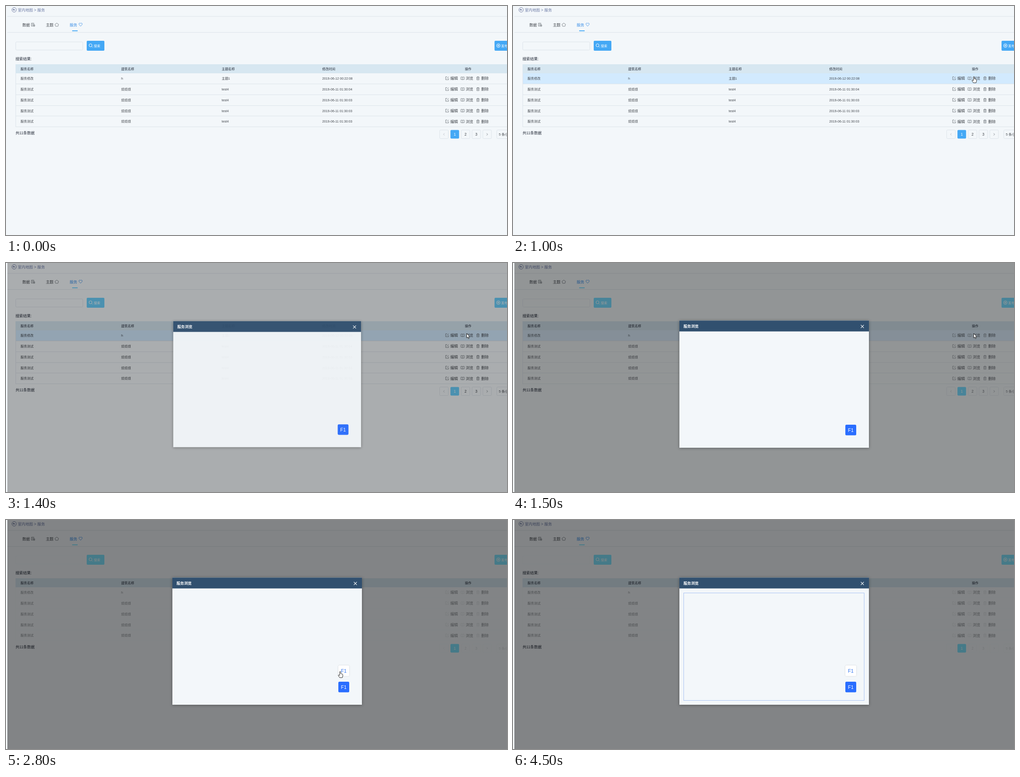
Animation, 1105 px wide and 507 px high, one loop 4800 ms. Source, as an HTML page:

```html
<!DOCTYPE html>
<html lang="zh-CN">
<head>
<meta charset="utf-8">
<title>服务浏览</title>
<style>
html, body { margin: 0; width: 100%; height: 100%; overflow: hidden; background: #f3f7fa; }
svg { display: block; width: 1105px; height: 507px; font-family: "Liberation Sans", "Noto Sans CJK SC", "Noto Sans CJK", sans-serif; }
.line { fill: none; stroke: #dde4ea; }
.icon { fill: none; stroke: #666c73; stroke-width: .8; }
#dialog { filter: drop-shadow(0 1px 3px rgba(0, 0, 0, .35)); }
</style>
</head>
<body>
<svg id="stage" viewBox="0 0 1105 507"></svg>
<script>
const BLUE = '#44a8f5', INK = '#40454b', DARK = '#262d3a';

// Text is placed by its left edge and vertical middle.
const text = (x, y, str, size = 7.2, fill = INK, extra = '') =>
  `<text x="${x}" y="${y + size * .37}" font-size="${size}" fill="${fill}" ${extra}>${str}</text>`;
const rect = (x, y, w, h, attrs) => `<rect x="${x}" y="${y}" width="${w}" height="${h}" ${attrs}/>`;
const path = (d, x = 0, y = 0, attrs = 'class="icon"') => `<path d="${d}" transform="translate(${x} ${y})" ${attrs}/>`;
const button = (x, y, w, h) => rect(x, y, w, h, `rx="2" class="accent" fill="${BLUE}"`);

const EDIT = 'M4 .5H.5V7H7V3.5M2.8 4.8L7.3 .3';
const BOOK = 'M4 1.2Q2 .3 .4 .8V6.4Q2 6 4 6.8Q6 6 7.6 6.4V.8Q6 .3 4 1.2V6.8';
const BIN = 'M0 1.6H6.6M2 1.4V.4H4.6V1.4M.9 1.6V7.4H5.7V1.6M2.5 3.2V5.8M4.1 3.2V5.8';

function header() {
  const trail = '#6d7ba6';
  return `<g fill="none" stroke="#747fa5"><circle cx="18" cy="8.5" r="5"/></g>` +
    path('M17 5.8L14.7 8.2L17 10.6V9.2Q19.5 8.8 20.8 10.6Q20.3 7.2 17 7.2Z', 0, 0, 'fill="#747fa5"') +
    text(26, 8.5, '室内地图 &gt; 服务', 8.4, trail) +
    path('M3 23H1105M3 58.5H1105', 0, 0, 'class="line"') +
    text(36, 42, '数据', 8.4) + text(88, 42, '主题', 8.4) + text(140.5, 42, '服务', 8.4, '#3a8ee6') +
    path('M6 3V.5H.5V7H3.5M2 2.5H4.5M2 4.5H3.5M4.5 4H7.8V7.5H4.5ZM4.5 5.7H7.8', 55.5, 37.5) +
    path('M4 .3L8 3.2L6.6 7.4H1.4L0 3.2Z', 108, 37.5) +
    path('M4 7.6L.6 3.8Q-.4 1 2 .4Q3.4 .3 4 1.6Q4.6 .3 6 .4Q8.4 1 7.4 3.8Z', 160.5, 37.3, 'class="icon" style="stroke:#3a8ee6"') +
    rect(146, 54, 12, 1.8, `class="accent" fill="${BLUE}"`);
}

function toolbar() {
  const white = 'fill="none" stroke="#fff"';
  return rect(21.5, 79.5, 148, 18, 'rx="2" class="line faint"') +
    button(178, 77, 39, 22) + `<g ${white}><circle cx="186.4" cy="87" r="3.3"/></g>` +
    path('M188.8 89.4L191 91.6', 0, 0, white) + text(193.5, 88.3, '搜索', 7.2, '#fff') +
    button(1077.5, 77, 40, 22) + `<g ${white}><circle cx="1086" cy="87.7" r="3.9"/></g>` +
    path('M1083.8 87.7H1088.2M1086 85.5V89.9', 0, 0, white) + text(1092, 88.3, '发布', 7.2, '#fff') +
    text(21, 117, '搜索结果:', 8.4, DARK);
}

function table() {
  const cols = [32, 254, 475.7, 697.5];
  const rows = [['服务修改', 'h', '主题1', '2019-06-12 00:22:08']];
  for (const s of [4, 3, 3, 3]) rows.push(['服务测试', '烦烦烦', 'test4', `2019-06-11 01:30:0${s}`]);
  let out = rect(21, 129, 1084, 20, 'fill="#d7e7f1"') + rect(21, 149, 1084, 23, 'id="hover" fill="#d2eafe"');
  ['服务名称', '建筑名称', '主题名称', '修改时间'].forEach((s, i) => out += text(cols[i], 139.5, s, 7.2, DARK));
  out += text(1012, 139.5, '操作', 7.2, DARK) + path('M21.5 149V268', 0, 0, 'class="line faint"');
  rows.forEach((row, r) => {
    const y = 160.2 + r * 23.9;
    out += path(`M21 ${Math.floor(y + 12)}.5H1105`, 0, 0, 'class="line faint"');
    out += '<g class="soft">' + row.map((s, i) => text(cols[i], y, s)).join('') +
      text(980, y, '编辑', 8.4) + text(1014, y, '浏览', 8.4) + text(1048, y, '删除', 8.4) + '</g>';
    out += '<g class="faint">' + path(EDIT, 969.2, y - 4) + path(BOOK, 1003, y - 3.8) + path(BIN, 1037.6, y - 4) + '</g>';
  });
  return out;
}

function pager() {
  let out = text(21, 280.5, '共11条数据', 8.4, DARK);
  for (let i = 0; i < 5; i++) {
    const x = 956.5 + i * 23.8;
    if (i === 1) out += button(x, 274.5, 19, 19);
    else out += rect(x, 274.5, 19, 19, 'rx="2" class="line faint"');
    if (i % 4) out += text(x + 9.5, 284, i, 8.4, i === 1 ? '#fff' : INK, `text-anchor="middle" ${i > 1 ? 'class="faint"' : ''}`);
  }
  return out + '<g class="faint">' +
    path('M967.2 281.8L964.8 284.2L967.2 286.6', 0, 0, 'fill="none" stroke="#bcc2c9"') +
    path('M1060 281.8L1062.4 284.2L1060 286.6', 0, 0, 'class="icon"') +
    rect(1082.5, 274.5, 50, 19, 'rx="2" class="line"') + text(1087, 284, '5 条/页') + '</g>';
}

function dialog() {
  const floor = (y, fill, ink, attrs = '') => `<g ${attrs}>` + rect(733, y, 24, 23.5, `rx="2.5" fill="${fill}"`) +
    text(745, y + 11.8, 'F1', 10.6, ink, 'text-anchor="middle"') + '</g>';
  return '<g id="dialog">' + rect(367, 127.5, 418, 281.5, 'fill="#f3f7fa"') +
    rect(367, 127.5, 418, 24, 'fill="#31506f"') +
    text(376, 140, '服务浏览', 8.4, '#fff', 'font-weight="bold"') +
    path('M767.2 137.2L773.8 143.8M773.8 137.2L767.2 143.8', 0, 0, 'stroke="#fff" stroke-width="1.1"') +
    rect(376.5, 161.5, 398, 238, 'id="focus" fill="none" stroke="#a9c3f3"') +
    floor(322, '#fff', '#2f74f0', 'id="popup" style="filter:drop-shadow(0 0 1.5px rgba(0,0,0,.15))"') +
    floor(358, '#2a6eff', '#fff') + '</g>';
}

const $ = id => document.getElementById(id);
$('stage').innerHTML = header() + toolbar() + table() + pager() +
  rect(3, 0, 1102, 507, 'id="shade"') + dialog() +
  '<path id="cursor" fill="#fff" stroke="#111" stroke-width=".9" stroke-linejoin="round"/>';

const ARROW = 'M0 0V10L2.3 7.9L4 11.6L5.6 10.9L4 7.3H7Z';
const HAND = 'M-1.2 8V1.2Q0 -.7 1.2 1.2V5.4Q2.6 4.4 3.2 5.8Q5.4 5.4 5.8 7.6V10.4L4.8 14H-1L-4.1 9.6Q-4.2 7.4 -2.4 8.2L-1.2 9.4Z';
const GRAB = 'M-2.5 5L-5 .8Q-4.8 -1 -3.2 .4L-3.8 -3Q-2.8 -5 -1.6 -3.2Q-1 -6 .4 -4.2Q1.8 -5.8 2.6 -3.4Q4.6 -4.4 4.8 -2L3.8 2.4L2.6 5ZM-1.6 -3.2L-1.2 -.5M.5 -4.2V-.6M2.6 -3.4L2.2 -.5';

// Pointer path: time, x, y and, where it changes, the shape.
const moves = [
  [100, 1086, 42, ARROW], [600, 1013, 152], [800, 1016, 156], [1000, 1016.5, 156, HAND],
  [1300, 1016, 156, ARROW], [1500, 1016, 156], [1800, 910, 187], [1900, 830, 250],
  [2000, 732, 345, GRAB], [2100, 722, 355], [2200, 725, 364], [2300, 737, 366, HAND],
  [2400, 737, 372], [2600, 737, 372], [2800, 737, 335], [2900, 737, 335], [3000, 740, 335],
  [3100, 740, 335], [3200, 737, 336], [3300, 729, 346, GRAB], [3500, 715.5, 347],
  [3700, 701, 357], [3800, 701, 357], [3900, 740, 320], [4000, 830, 240, ARROW],
  [4300, 1061, 37], [4400, 1086, 24], [4500, 1110, 10]
];

// Linear interpolation of column c in a list of timed rows.
function at(list, t, c) {
  const i = list.findIndex(k => k[0] > t);
  if (i === 0) return list[0][c];
  if (i < 0) return list[list.length - 1][c];
  const a = list[i - 1], b = list[i];
  return a[c] + (b[c] - a[c]) * (t - a[0]) / (b[0] - a[0]);
}

// Time, shade, dialog opacity, dialog scale
const opening = [[1200, 0, 0, .85], [1300, .08, .48, .933], [1400, .3, .94, .991], [1500, .4, 1, 1], [1700, .465, 1, 1]];
const show = (id, on) => $(id).style.display = on ? '' : 'none';
const fade = (cls, value) => document.querySelectorAll(cls).forEach(e => e.style.opacity = value);
const clamp = v => Math.min(1, Math.max(0, v));

function draw(t) {
  const shade = at(opening, t, 1), dim = shade / .465, late = clamp((t - 1400) / 300);
  $('hover').style.opacity = clamp((t - 600) / 200) * (1 - late);
  $('shade').style.opacity = shade;
  $('dialog').style.opacity = at(opening, t, 2);
  $('dialog').setAttribute('transform', `translate(576 268.25) scale(${at(opening, t, 3)}) translate(-576 -268.25)`);
  show('dialog', t >= 1300);
  show('popup', t >= 2300);
  show('focus', t >= 3800);
  fade('.faint', 1 - .85 * late);
  fade('.soft', 1 - .4 * late);
  document.querySelectorAll('.accent').forEach(e =>
    e.style.fill = `rgb(${68 + 60 * dim},${168 + 60 * dim},${245 + 10 * dim})`);

  show('cursor', t >= 100 && t < 4500);
  const shape = moves.filter(m => m[3] && m[0] <= t).pop();
  if (shape) $('cursor').setAttribute('d', shape[3]);
  $('cursor').setAttribute('transform', `translate(${at(moves, t, 1)} ${at(moves, t, 2)})`);
}

let last = -1;
function tick() {
  const t = Math.floor(performance.now() % 4800 / 100) * 100;
  if (t !== last) draw(last = t);
  requestAnimationFrame(tick);
}
tick();
</script>
</body>
</html>
```
